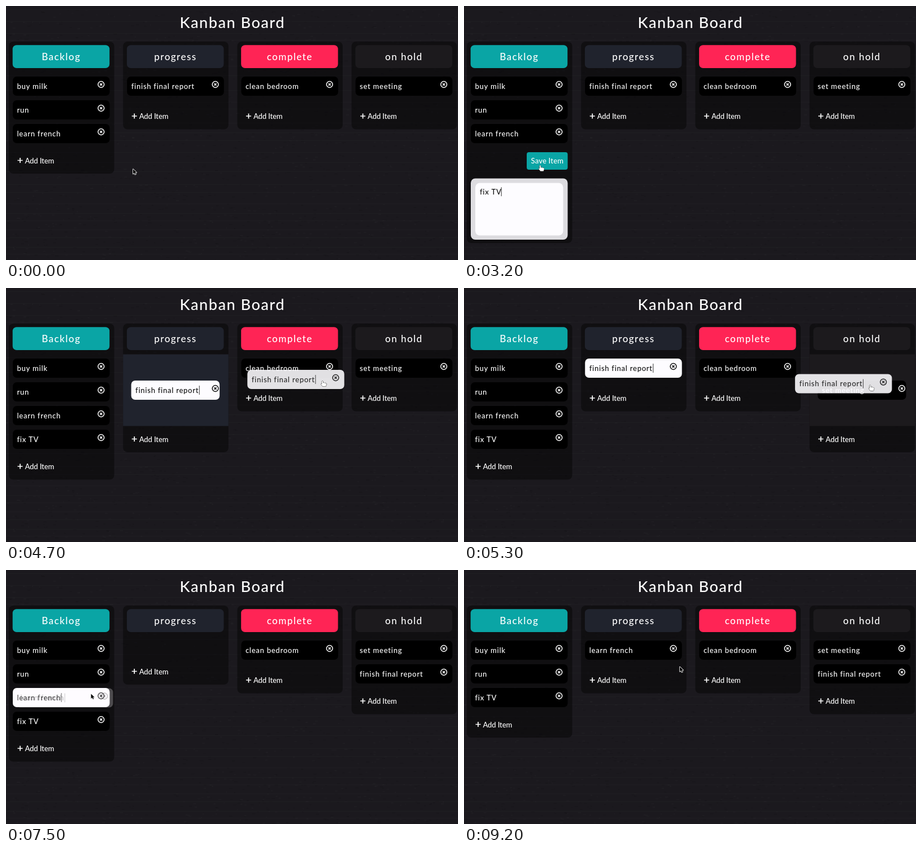
These frames come from a looping animation (800x450 px, 9.3 s). An HTML page with a canvas:

```html
<!DOCTYPE html>
<html lang="en">
<head>
<meta charset="utf-8">
<title>Kanban Board</title>
<style>
html, body { margin: 0; width: 100%; height: 100%; overflow: hidden; background: #1b191e; }
canvas { display: block; }
</style>
</head>
<body>
<canvas id="stage" width="800" height="450"></canvas>
<script>
const LOOP = 9300, STEP = 100;
const FONT = 'Lato, "Open Sans", sans-serif';
const LIST_TOP = 117.5, ROW = 42, ITEM_W = 171.5, ITEM_H = 34;
const ADD_Y = [180, 195.5, 232.5, 274, 316.5];
const COLUMNS = [
  ['Backlog', '#0aa5a5'], ['progress', '#20232d'],
  ['complete', '#ff2455'], ['on hold', '#1c1a1d']
];
const OPEN = 1200, SAVE = 3500;
const DRAGS = [
  { text: 'finish final report', from: 1, row: 0, to: 3, focus: 4000, start: 4300, drop: 6500, grab: [347, 144] },
  { text: 'learn french', from: 0, row: 2, to: 1, focus: 7300, start: 7400, drop: 8500, grab: [144.5, 219] }
];
// Highlighted column from each time on; -1 is none.
const OVERS = [[0, -1], [4400, 1], [4800, 2], [5300, 3], [6500, -1], [7600, 0], [7900, 1], [8500, -1]];
const POINTERS = [
  [0, 'arrow'], [900, 'hand'], [1400, 'arrow'], [1600, 'beam'], [3200, 'hand'], [3700, 'arrow'],
  [4000, 'hand'], [6700, 'arrow'], [7200, 'hand'], [7400, 'arrow']
];
const PATH = [
  [0, 225, 289], [300, 225, 289], [1000, 62, 274], [1300, 62, 274], [1700, 68, 331], [2900, 68, 331],
  [3300, 147, 273], [3600, 147, 273], [4100, 347, 144], [4300, 347, 144], [4700, 560, 164],
  [5400, 728, 172], [6100, 746, 134], [6500, 740, 146], [6700, 740, 146], [7300, 144.5, 219],
  [7400, 144.5, 219], [7500, 150.5, 219.5], [8100, 352, 150], [8600, 356, 152], [9100, 382, 171.5], [LOOP, 382, 171.5]
];

const g = document.getElementById('stage').getContext('2d');
const at = (list, t) => list.filter(e => e[0] <= t).pop()[1];
const panelX = c => 5 + 202.2 * c;

function pointerAt(t) {
  const i = PATH.findIndex(p => p[0] > t), [t0, x0, y0] = PATH[i - 1], [t1, x1, y1] = PATH[i];
  const u = (t - t0) / (t1 - t0), k = u * u * (3 - 2 * u);
  return [x0 + (x1 - x0) * k, y0 + (y1 - y0) * k];
}

function box(x, y, w, h, r, fill) {
  g.fillStyle = fill;
  g.beginPath();
  g.roundRect(x, y, w, h, r);
  g.fill();
}

function text(s, x, y, size, spacing, color = '#fff') {
  g.font = `500 ${size}px ${FONT}`;
  g.letterSpacing = spacing + 'px';
  g.fillStyle = color;
  g.fillText(s, x, y);
  return g.measureText(s).width;
}

function centered(s, x, y, size, spacing) {
  g.font = `500 ${size}px ${FONT}`;
  g.letterSpacing = spacing + 'px';
  text(s, x - (g.measureText(s).width - spacing) / 2, y, size, spacing);
}

function lines(color, width, ...segments) {
  g.strokeStyle = color;
  g.lineWidth = width;
  g.beginPath();
  for (const [x0, y0, x1, y1] of segments) { g.moveTo(x0, y0); g.lineTo(x1, y1); }
  g.stroke();
}

function item(label, x, y, w, iconX, focused) {
  const ink = focused ? '#111' : '#fff';
  box(x, y, w, ITEM_H, 7, focused ? '#fdfcff' : '#000');
  const end = x + 8 + text(label, x + 7.5, y + 21.5, 13, .75, ink);
  if (focused) lines('#333', 1, [end + .5, y + 9, end + .5, y + 25]);
  const cy = y + 14;
  lines(ink, 1.5, [iconX - 2, cy - 2, iconX + 2, cy + 2], [iconX + 2, cy - 2, iconX - 2, cy + 2]);
  g.beginPath();
  g.arc(iconX, cy, 5.4, 0, 7);
  g.stroke();
}

function editor(t) {
  box(111, 259, 72.5, 31, 4, '#0aa5a5');
  text('Save Item', 118.5, 278.5, 13, .2);
  box(12, 305.5, ITEM_W, 108.5, 8, '#dddce0');
  box(20, 313.5, 155.5, 93, 8, '#fdfcff');
  const count = Math.max(0, Math.floor((t - 1900) / 150));
  const w = text('fix TV'.slice(0, count), 28, 334, 13, .75, '#111');
  if (count || (t - OPEN) % 1000 < 700) lines('#333', 1, [27.5 + w, 321, 27.5 + w, 337]);
}

function column(c, items, over, focused, t) {
  const x = panelX(c), [name, color] = COLUMNS[c], n = items.length;
  const editing = c === 0 && t >= OPEN && t < SAVE;
  const addY = over ? (n ? 226 + ROW * n : 219) : ADD_Y[n];
  box(x, 63, 186.5, (editing ? 420 : addY + 23) - 63, 8, 'rgba(0,0,0,.42)');
  box(x + 6.7, 69.3, ITEM_W, 40.7, 7, color);
  centered(name, x + 92, 96, 17, 1.45);
  if (over) box(x, LIST_TOP, 186.5, addY - 23.5 - LIST_TOP, 0, color);
  items.forEach((label, i) => item(
    label, x + (over ? 14.4 : 7), (over ? 164 : 125) + ROW * i,
    over ? 156.5 : ITEM_W, x + 163.3, label === focused
  ));
  if (editing) return editor(t);
  lines('#fff', 1.7, [x + 15.5, addY - .5, x + 24.5, addY - .5], [x + 20, addY - 5, x + 20, addY + 4]);
  text('Add Item', x + 28.5, addY + 4.5, 13, -.1);
}

const SHAPES = {
  arrow: new Path2D('M0 0V8.4L2 6.6L3.4 9.6L4.8 9L3.5 6H6.1Z'),
  hand: new Path2D('M-.8 1Q0-.5 1 1V4.5L2 3.6L3.2 4.6L4.4 4L5.4 5L6.6 4.8Q7.4 5.2 7 7.5L6 10.5H0.6L-2.6 6.4Q-2.4 5-.8 6.2Z')
};

function pointer(kind, x, y) {
  if (kind === 'beam') {
    lines('#333', 1, [x, y - 4, x, y + 4], [x - 2, y - 4.5, x + 2, y - 4.5], [x - 2, y + 4.5, x + 2, y + 4.5]);
    return;
  }
  const hand = kind === 'hand';
  g.save();
  g.translate(x, y);
  g.lineJoin = 'round';
  g.lineWidth = hand ? 1 : 1.6;
  g.strokeStyle = hand ? '#222' : '#fff';
  g.fillStyle = hand ? '#fff' : '#000';
  g.stroke(SHAPES[kind]);
  g.fill(SHAPES[kind]);
  g.restore();
}

// Dark wallpaper with faint rules and flecks.
const wall = new OffscreenCanvas(800, 450), w = wall.getContext('2d');
let seed = 7;
const random = () => (seed = seed * 16807 % 2147483647) / 2147483647;
w.fillStyle = '#1b191e';
w.fillRect(0, 0, 800, 450);
for (let y = 6; y < 450; y += 12 + random() * 14) {
  w.fillStyle = 'rgba(255,255,255,.02)';
  w.fillRect(0, Math.round(y), 800, 1);
  for (let i = 0; i < 70; i++) {
    w.fillStyle = random() < .6 ? 'rgba(0,0,0,.1)' : 'rgba(255,255,255,.018)';
    w.fillRect(random() * 800, y + random() * 14, 2 + random() * 4, 1 + random());
  }
}

function draw(t) {
  const lists = [['buy milk', 'run', 'learn french'], ['finish final report'], ['clean bedroom'], ['set meeting']];
  if (t >= SAVE) lists[0].push('fix TV');
  for (const d of DRAGS) if (t >= d.drop) {
    lists[d.from] = lists[d.from].filter(s => s !== d.text);
    lists[d.to].push(d.text);
  }
  const drag = DRAGS.find(d => t >= d.focus && t < d.drop);
  const over = at(OVERS, t), [x, y] = pointerAt(t);

  g.drawImage(wall, 0, 0);
  centered('Kanban Board', 400, 39, 27, 1.55);
  lists.forEach((items, c) => column(c, items, c === over, drag && drag.text, t));
  if (drag && t > drag.start) {
    const gx = panelX(drag.from) + 7 + x - drag.grab[0];
    const gy = 125 + ROW * drag.row + y - drag.grab[1];
    g.globalAlpha = Math.min(.89, (t - drag.start) / 400);
    item(drag.text, gx, gy, ITEM_W, gx + 156.3, true);
    g.globalAlpha = 1;
  }
  pointer(at(POINTERS, t), x, y);
}

const begin = performance.now();
function tick() {
  const t = (performance.now() - begin) % LOOP;
  draw(Math.floor(t / STEP) * STEP);
  requestAnimationFrame(tick);
}
tick();
</script>
</body>
</html>
```
